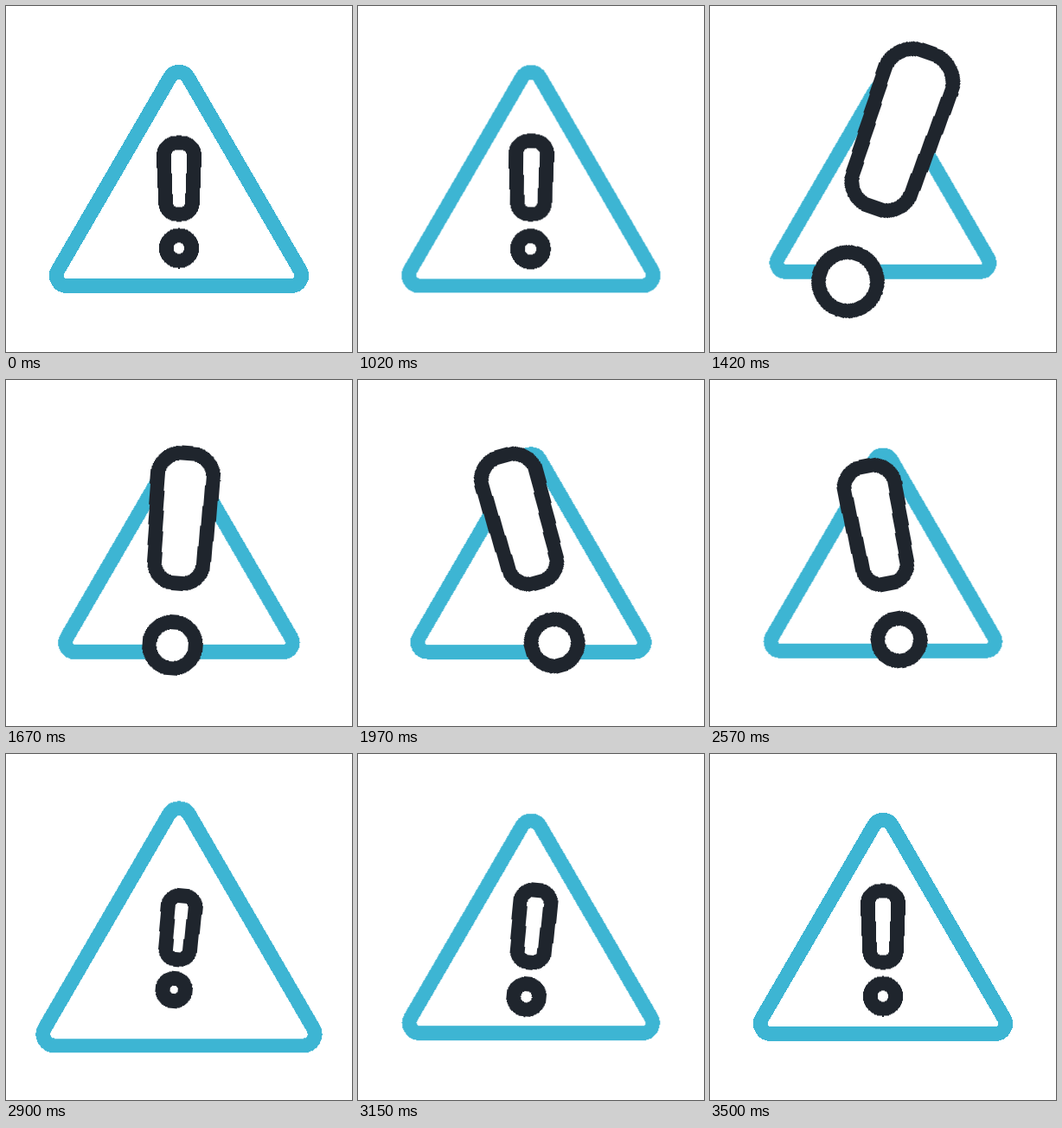
Write an HTML page that moves like this. It is 400x400 px and loops after 3520 ms.

```html
<!DOCTYPE html>
<html lang="en">
<head>
<meta charset="utf-8">
<title>Warning sign</title>
<style>
  html, body { margin: 0; width: 100%; height: 100%; overflow: hidden; background: #fff; }
  svg { display: block; width: 100%; height: 100%; shape-rendering: crispEdges; }

  path, circle {
    fill: #fff;
    stroke: #1f252d;
    stroke-width: 16.7;
    vector-effect: non-scaling-stroke;
  }
  .sign { stroke: #3db5d3; }

  .sign, .lift, .swing, .zoom {
    transform-origin: 0 0;
    animation: 3.52s cubic-bezier(.333, 0, .667, 1) infinite;
  }
  .sign  { animation-name: sign; }
  .lift  { animation-name: lift; }
  .swing { animation-name: swing; }
  .zoom  { animation-name: zoom; }

  @keyframes sign {
    0%, 28.41% { transform: scale(1); }
    35.94% { transform: scale(.848); }
    51.14% { transform: scale(.94); }
    69.46% { transform: scale(.85); }
    80.68% { transform: scale(1.12); }
    90.34% { transform: scale(.99); }
    99.43%, 100% { transform: scale(1); }
  }
  @keyframes lift {
    0%, 28.41% { transform: translate(0, 26.5px); }
    35.94% { transform: translate(0, 0); }
    51.99% { transform: translate(0, 11.2px); }
    65.34% { transform: translate(4.5px, 0); }
    80.97% { transform: translate(-1.4px, 24.6px); }
    90.34%, 100% { transform: translate(0, 26.5px); }
  }
  @keyframes swing {
    0%, 28.41% { transform: rotate(0deg); }
    35.17% { transform: rotate(23.4deg); }
    63.32% { transform: rotate(-23.3deg); }
    85.51% { transform: rotate(7deg); }
    99.43%, 100% { transform: rotate(0deg); }
  }
  @keyframes zoom {
    0%, 28.41% { transform: scale(1); }
    35.94% { transform: scale(2.45); }
    51.99% { transform: scale(1.68); }
    65.34% { transform: scale(2.43); }
    80.97% { transform: scale(.89); }
    90.34% { transform: scale(1.02); }
    99.43%, 100% { transform: scale(1); }
  }
</style>
</head>
<body>
<svg viewBox="0 0 400 400">
  <g transform="translate(200 200)">
    <path class="sign" d="M10.4-117.7 140.1 105.7A12 12 0 0 1 129.7 123.7H-129.7A12 12 0 0 1-140.1 105.7L-10.4-117.7A12 12 0 0 1 10.4-117.7Z"/>
    <g class="lift">
      <g class="swing">
        <g class="zoom">
          <path d="M-2.7-68.2H2.7A15 15 0 0 1 17.7-52.7L15.4 1.6A13 13 0 0 1 2.4 14.2H-2.4A13 13 0 0 1-15.4 1.6L-17.7-52.7A15 15 0 0 1-2.7-68.2Z"/>
          <circle cy="53.5" r="14.7"/>
        </g>
      </g>
    </g>
  </g>
</svg>
</body>
</html>
```
